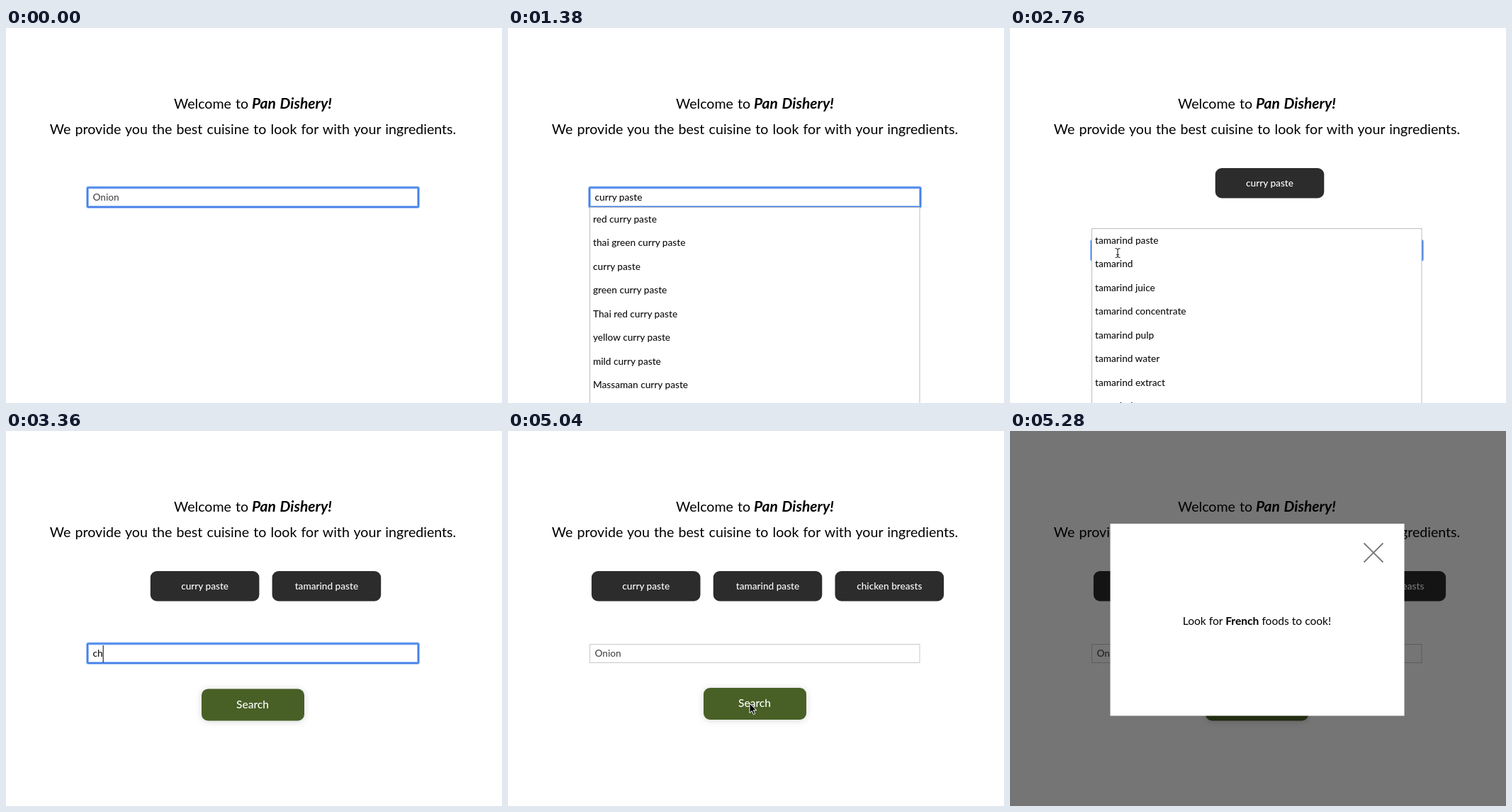
An HTML page for the animation above (7280 ms loop, 700x530 px).

```html
<!DOCTYPE html>
<html lang="en">
<head>
<meta charset="utf-8">
<title>Cuisine finder</title>
<style>
  html, body { margin: 0; width: 100%; height: 100%; overflow: hidden; background: #fff; }
  svg { display: block; width: 700px; height: 530px; font: 13.65px Lato, "Noto Sans", sans-serif; }
  .headline { font-size: 19.6px; word-spacing: 1.2px; }
  .brand { font-size: 21px; font-weight: 700; font-style: italic; }
  .chip { fill: #2c2c2c; }
  .light { fill: #fff; text-anchor: middle; font-weight: 500; }
  .item { fill: #111; font-weight: 500; }
  .halo { fill: none; stroke: #9dc0f7; stroke-width: 4; }
  .ring { fill: none; stroke: #4682e8; stroke-width: 2; }
  #button rect { fill: #486026; filter: drop-shadow(0 1px 5px rgba(0, 0, 0, .16)); }
  #button text { font-size: 15.5px; }
  #modal text { font-size: 15.6px; text-anchor: middle; }
</style>
</head>
<body>
<svg viewBox="0 0 700 530">
  <text class="headline" x="237" y="114">Welcome to</text>
  <text class="headline brand" x="347" y="114">Pan Dishery!</text>
  <text class="headline" x="348.5" y="150" text-anchor="middle">We provide you the best cuisine to look for with your ingredients.</text>
  <g id="chips"></g>
  <g id="field">
    <rect x="115.5" y="226.5" width="465.5" height="26" fill="#fff" stroke="#c8c8c8"/>
    <g id="focus">
      <rect class="halo" x="115" y="225.5" width="467" height="27.5" rx="1.5"/>
      <rect class="ring" x="115" y="225.5" width="467" height="27.5" rx="1"/>
    </g>
    <text id="value" class="item" x="122.5" y="243.5" xml:space="preserve"></text>
    <rect id="caret" y="228" width="1" height="24"/>
  </g>
  <g id="button">
    <rect x="276" y="364.5" width="145" height="45" rx="9"/>
    <text class="light" x="348" y="391.5">Search</text>
  </g>
  <g id="menu"></g>
  <g id="modal">
    <rect width="700" height="530" fill="#000" fill-opacity=".54"/>
    <rect x="141.5" y="131" width="415" height="271.5" fill="#fff"/>
    <path d="M499.5 158.5l27 27m0-27l-27 27" stroke="#777" stroke-width="1.8"/>
    <text x="348.5" y="274">Look for <tspan font-weight="700">French</tspan> foods to cook!</text>
  </g>
  <g id="pointer">
    <path id="arrow" d="M0 0v13.5l3.2-2.9 2.2 5 2.3-1-2.2-4.9h4.3z" fill="#000" stroke="#fff"/>
    <g id="beam" fill="none">
      <path d="M-3.5-6.5q3.5 0 3.5 2.5q0-2.5 3.5-2.5M0-4v8M-3.5 6.5q3.5 0 3.5-2.5q0 2.5 3.5 2.5M-2 2.5h4" stroke="#fff" stroke-width="2.6"/>
      <path d="M-3.5-6.5q3.5 0 3.5 2.5q0-2.5 3.5-2.5M0-4v8M-3.5 6.5q3.5 0 3.5-2.5q0 2.5 3.5 2.5M-2 2.5h4" stroke="#222" stroke-width="1.1"/>
    </g>
  </g>
</svg>
<script>
const LOOP = 7280, TICK = 60;
const $ = id => document.getElementById(id);
const show = (id, on) => { $(id).style.display = on ? '' : 'none'; };

const picks = ['curry paste', 'tamarind paste', 'chicken breasts'];
const menus = {
  curry: ['red curry paste', 'thai green curry paste', 'curry paste', 'green curry paste',
    'Thai red curry paste', 'yellow curry paste', 'mild curry paste', 'Massaman curry paste'],
  tamarind: ['tamarind paste', 'tamarind', 'tamarind juice', 'tamarind concentrate',
    'tamarind pulp', 'tamarind water', 'tamarind extract', 'tamarind sauce'],
  chicken: ['grilled chicken breasts', 'chicken breasts', 'chicken breast halves',
    'bone-in chicken breasts', 'boneless skinless chicken breast halves',
    'boneless skinless chicken breasts', 'skinless chicken breasts', 'boneless chicken breasts']
};

// Each step changes only the listed parts of the state.
const steps = [
  [0, { text: '', caret: false, focus: true, chips: 0, menu: '', hover: false, modal: 0 }],
  [60, { caret: true }], [240, { caret: false }], [420, { caret: true }], [660, { caret: false }],
  [840, { text: 'c', caret: true }], [900, { text: 'cu' }], [960, { text: 'cur' }],
  [1020, { text: 'curr', menu: 'curry' }], [1080, { text: 'curry' }], [1200, { text: 'curry p' }],
  [1260, { text: 'curry pa' }], [1320, { text: 'curry past' }],
  [1380, { text: 'curry paste', caret: false }],
  [1860, { text: '', menu: '', chips: 1, caret: true }], [2040, { caret: false }],
  [2160, { text: 't', caret: true }], [2220, { text: 'ta' }], [2280, { text: 'tam' }],
  [2340, { text: 'tama' }], [2400, { text: 'tamar', menu: 'tamarind' }],
  [2940, { text: '', menu: '', chips: 2 }], [3120, { caret: false }],
  [3300, { text: 'c', caret: true }], [3360, { text: 'ch' }], [3420, { text: 'chi' }],
  [3480, { text: 'chic' }], [3540, { text: 'chick', menu: 'chicken' }],
  [4560, { text: '', menu: '', chips: 3 }], [4740, { caret: false }],
  [4920, { hover: true }], [4980, { focus: false }],
  [5100, { hover: false, modal: .3 }], [5160, { modal: .6 }], [5220, { modal: .85 }], [5280, { modal: 1 }]
];

// Pointer paths: [time, x, y]; hidden outside each path.
const paths = [
  [[1620, 28, 420], [1740, 125, 352], [1800, 150, 338], [2160, 152, 318]],
  [[2760, 152, 318], [2880, 162, 301], [3000, 165, 304], [3300, 168, 314]],
  [[4260, 168, 314], [4440, 182, 330], [4560, 184, 332], [4920, 341, 385], [5280, 341, 385]]
];

const svgText = (label, x, y, name) => `<text class="${name}" x="${x}" y="${y}">${label}</text>`;

function chipsMarkup(count) {
  return picks.slice(0, count).map((label, i) => {
    const x = 366.5 + (i - (count - 1) / 2) * 171.8;
    return `<rect class="chip" x="${x - 76.8}" y="198" width="153.6" height="42.5" rx="9"/>` +
      svgText(label, x, 223.5, 'light');
  }).join('');
}

function menuMarkup(name, top) {
  if (!name) return '';
  return `<rect x="115.5" y="${top}" width="465.5" height="400" fill="#fff" stroke="#bdbdbd"/>` +
    menus[name].map((label, i) => svgText(label, 120, top + 21.3 + i * 33.5, 'item')).join('');
}

function pointerAt(t) {
  const path = paths.find(p => t >= p[0][0] && t < p[p.length - 1][0]);
  if (!path) return null;
  const i = path.findIndex(p => p[0] > t);
  const [a, b] = [path[i - 1], path[i]];
  const k = (t - a[0]) / (b[0] - a[0]);
  return [a[1] + (b[1] - a[1]) * k, a[2] + (b[2] - a[2]) * k];
}

function drawPointer(t, state) {
  const point = pointerAt(t);
  show('pointer', point);
  if (!point) return;
  const [x, y] = point;
  const overText = x > 115 && x < 582 && (state.menu ? y > 253 : y > 300 && y < 328);
  show('beam', overText);
  show('arrow', !overText);
  $('pointer').setAttribute('transform', `translate(${x} ${y})`);
}

function draw(t) {
  const state = Object.assign({}, ...steps.filter(s => s[0] <= t).map(s => s[1]));
  const { text, chips, menu } = state;
  $('chips').innerHTML = chipsMarkup(chips);
  $('menu').innerHTML = menuMarkup(menu, chips ? 283.5 : 253.5);
  $('field').setAttribute('transform', `translate(0 ${chips ? 75 : 0})`);
  show('focus', state.focus);
  $('value').textContent = text || 'Onion';
  $('value').style.fill = text ? '#111' : '#4c4c4c';
  show('caret', state.caret);
  $('caret').setAttribute('x', text ? 122.5 + $('value').getComputedTextLength() : 122.5);
  show('button', chips);
  $('button').setAttribute('transform', `translate(0 ${state.hover ? -1.5 : 0})`);
  show('modal', state.modal);
  $('modal').style.opacity = state.modal;
  drawPointer(t, state);
}

let last = -1;
function frame() {
  const t = Math.floor(performance.now() % LOOP / TICK) * TICK;
  if (t !== last) draw(last = t);
  requestAnimationFrame(frame);
}
frame();
</script>
</body>
</html>
```
